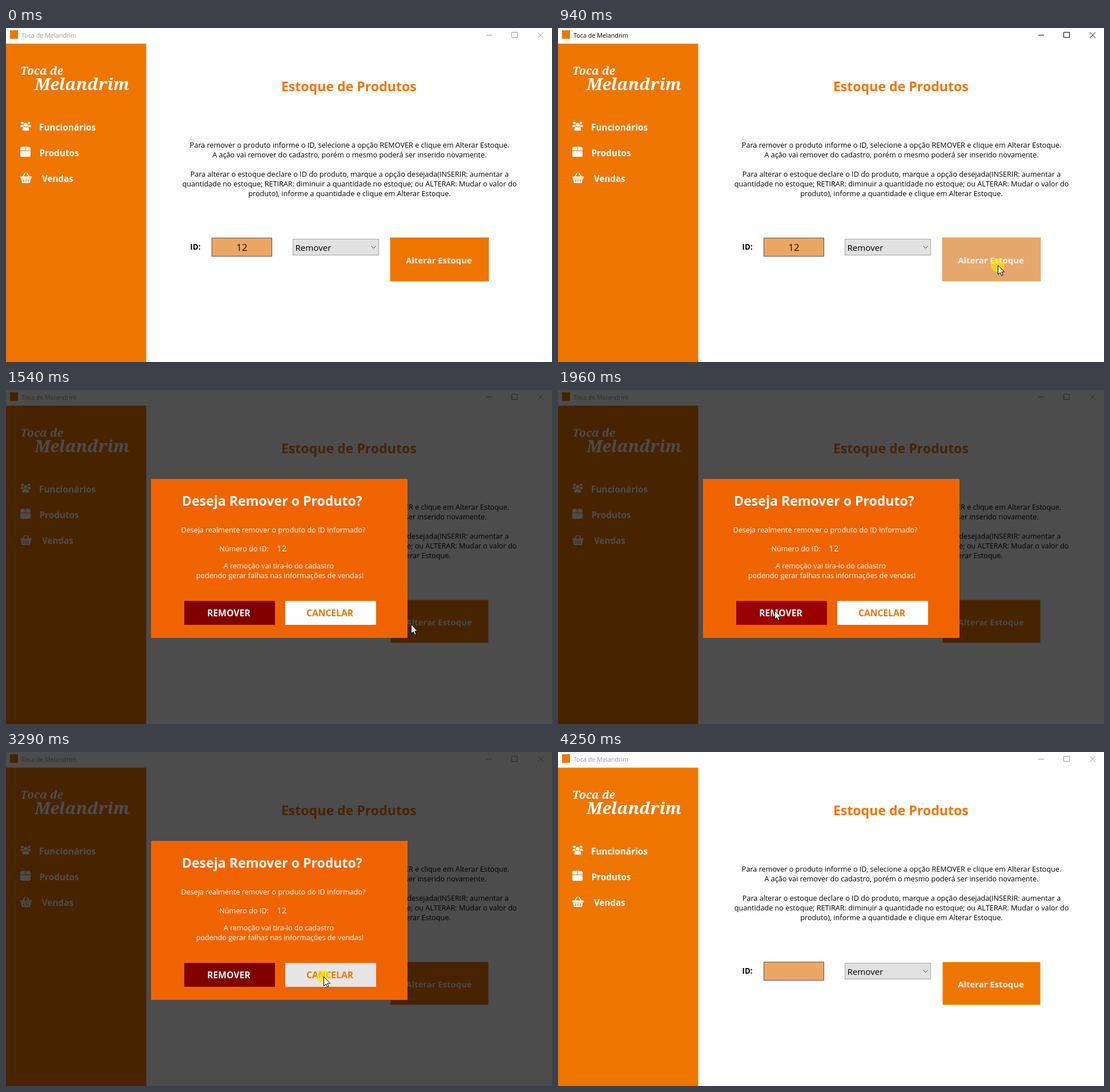
Recreate the animation shown at these times as an HTML page with a canvas. Size 956 px wide and 586 px high, loop 4.39 s.

```html
<!DOCTYPE html>
<html lang="pt">
<head>
<meta charset="utf-8">
<title>Estoque</title>
<style>
html, body { margin: 0; width: 100%; height: 100%; overflow: hidden; background: #fff; }
canvas { display: block; }
</style>
</head>
<body>
<canvas id="stage" width="956" height="586"></canvas>
<script>
const g = document.getElementById('stage').getContext('2d');
const LOOP = 4390, STEP = 69.5;
const ORANGE = '#ee7600', WHITE = '#fff';
const CLICK = 940, OPEN = 1070, READY = 1140, CANCEL = 3290, CLOSE = 3420, LEAVE = 4250;

const smooth = p => p * p * (3 - 2 * p);
const moves = [
  { at: 390, n: 7, from: [923, 566], to: [770, 416], ease: p => 1 - (1 - p) ** 1.5 },
  { at: 1470, n: 8, from: [770, 416], to: [379, 386], ease: smooth },
  { at: 2490, n: 3, from: [379, 386], to: [556, 394], ease: smooth },
  { at: 3490, n: 11, from: [556, 394], to: [900, 575], ease: p => p ** 3, bend: 1.5 }
];

// The pointer is sampled in steps, as in a screen recording.
function pointer(t) {
  if (t < moves[0].at || t >= LEAVE) return null;
  const m = moves.filter(m => t >= m.at).pop();
  const k = Math.min(m.n, Math.floor((t - m.at) / STEP) + 1);
  const p = m.ease(k / m.n), q = p ** (m.bend || 1);
  return [
    Math.round(m.from[0] + (m.to[0] - m.from[0]) * p),
    Math.round(m.from[1] + (m.to[1] - m.from[1]) * q)
  ];
}

function rect(x, y, w, h, color) {
  g.fillStyle = color;
  g.fillRect(x, y, w, h);
}

function frame(x, y, w, h, fill, line) {
  rect(x, y, w, h, line);
  rect(x + 1, y + 1, w - 2, h - 2, fill);
}

function text(s, x, y, size, color, { style = '', align = 'left', family = '"Open Sans", sans-serif' } = {}) {
  g.font = `${style} ${size}px ${family}`;
  g.textAlign = align;
  g.fillStyle = color;
  g.fillText(s, x, y);
}

const bold = { style: 'bold' };
const center = { align: 'center' };
const boldCenter = { style: 'bold', align: 'center' };

function line(color, width, ...points) {
  g.strokeStyle = color;
  g.lineWidth = width;
  g.beginPath();
  points.forEach(([x, y]) => g.lineTo(x, y));
  g.stroke();
}

function shape(color, ...points) {
  g.fillStyle = color;
  g.beginPath();
  points.forEach(([x, y]) => g.lineTo(x, y));
  g.closePath();
  g.fill();
}

function disc(x, y, r, color) {
  g.fillStyle = color;
  g.beginPath();
  g.arc(x, y, r, 0, 7);
  g.fill();
}

function round(x, y, w, h, radii, color) {
  g.fillStyle = color;
  g.beginPath();
  g.roundRect(x, y, w, h, radii);
  g.fill();
}

function inside(p, x, y, w, h) {
  return p && p[0] >= x && p[0] < x + w && p[1] >= y && p[1] < y + h;
}

function titleBar(active) {
  const ink = active ? '#000' : '#999';
  rect(7, 4, 14, 15, ORANGE);
  text('Toca de Melandrim', 27, 17, 10.8, ink);
  rect(841, 12, 10, 1, ink);
  frame(885, 7, 11, 10, WHITE, ink);
  line(ink, 1, [931, 7.5], [941, 17.5]);
  line(ink, 1, [941, 7.5], [931, 17.5]);
}

function icons() {
  for (const x of [28.5, 40.5]) {
    disc(x, 166.5, 2.3, WHITE);
    round(x - 3.3, 170, 6.6, 3.8, [3, 3, 1, 1], WHITE);
  }
  disc(34.5, 170, 4.3, ORANGE);
  disc(34.5, 169.8, 3.3, WHITE);
  round(28.6, 174, 11.8, 6, [4, 4, 1, 1], WHITE);

  round(25, 208.5, 8.5, 6.5, [3, 0, 0, 0], WHITE);
  round(34.5, 208.5, 8.5, 6.5, [0, 3, 0, 0], WHITE);
  round(25, 216, 18, 10, [0, 0, 2, 2], WHITE);

  line(WHITE, 2, [29, 262], [33.5, 254.5]);
  line(WHITE, 2, [41, 262], [36.5, 254.5]);
  round(25, 260.5, 20, 3, 1, WHITE);
  shape(WHITE, [26.5, 264], [43.5, 264], [42, 272], [28, 272]);
  for (const x of [30.5, 34.3, 38.1]) rect(x, 265, 1.4, 5, ORANGE);
}

function sidebar() {
  rect(0, 27.5, 245.5, 559, ORANGE);
  const logo = { style: 'italic 900', family: '"Noto Serif", serif' };
  text('Toca de', 25, 82, 19.3, WHITE, logo);
  text('Melandrim', 50, 109, 29, WHITE, logo);
  icons();
  text('Funcionários', 58, 179.5, 15.4, WHITE, bold);
  text('Produtos', 58.5, 224.5, 15.3, WHITE, bold);
  text('Vendas', 63, 269.5, 15.2, WHITE, bold);
}

function page(t, hover) {
  rect(0, 0, 956, 586, WHITE);
  titleBar((t >= CLICK && t < OPEN) || (t >= CLOSE && t < LEAVE));
  sidebar();
  text('Estoque de Produtos', 600.3, 111, 23.1, ORANGE, boldCenter);
  [
    ['Para remover o produto informe o ID, selecione a opção REMOVER e clique em Alterar Estoque.', 210],
    ['A ação vai remover do cadastro, porém o mesmo poderá ser inserido novamente.', 227],
    ['Para alterar o estoque declare o ID do produto, marque a opção desejada(INSERIR: aumentar a', 261],
    ['quantidade no estoque; RETIRAR: diminuir a quantidade no estoque; ou ALTERAR: Mudar o valor do', 278],
    ['produto), informe a quantidade e clique em Alterar Estoque.', 295]
  ].forEach(([s, y]) => text(s, 601.5, y, 12.65, '#000', center));

  text('ID:', 322.5, 389, 13.3, '#000', bold);
  frame(360, 368, 106, 33, '#eba664', '#555');
  if (t < CLOSE) text('12', 413, 391, 17, '#111', center);
  frame(502, 370, 151, 29, '#e1e1e1', '#a5a5a5');
  text('Remover', 506.5, 391, 15.1, '#000');
  line('#444', 1, [639.5, 382.5], [643.5, 386.5], [647.5, 382.5]);

  // The focused button is one pixel larger on each side.
  const inset = (t >= READY && t < CLOSE) || t >= LEAVE ? 1 : 0;
  rect(672.5 + inset, 367.5 + inset, 173 - 2 * inset, 77 - 2 * inset, hover ? '#e5a76b' : ORANGE);
  text('Alterar Estoque', 758, 413, 14.9, '#f0f0f0', boldCenter);
}

function dialog(t, p) {
  const loading = t < READY;
  rect(0, 0, 956, 586, 'rgba(0,0,0,.7)');
  g.fillStyle = '#f06400';
  g.beginPath();
  g.rect(254, 156, 449, 279);
  if (loading) {
    // Labels that are not painted yet leave gaps.
    g.rect(302, 178, 331, 31);
    g.rect(473, 266, 100, 22);
    g.rect(329, 299, 303, 34);
  }
  g.fill('evenodd');
  if (loading) {
    rect(303, 236, 336, 17, '#000');
    rect(371, 269, 95, 17, '#000');
  } else {
    text('Deseja Remover o Produto?', 466, 203, 23.1, WHITE, boldCenter);
    text('Deseja realmente remover o produto do ID informado?', 468, 250, 12.6, WHITE, center);
    text('Número do ID:', 373.5, 283, 12.6, WHITE);
    text('12', 474, 283, 15.2, WHITE);
    text('A remoção vai tira-lo do cadastro', 477.5, 313, 12.6, WHITE, center);
    text('podendo gerar falhas nas informações de vendas!', 479.5, 330, 12.6, WHITE, center);
  }
  const remove = [312, 370, 159, 42], cancel = [489, 370, 159, 42];
  rect(...remove, inside(p, ...remove) ? '#990000' : '#800000');
  rect(...cancel, inside(p, ...cancel) ? '#e5e5e5' : WHITE);
  text('REMOVER', 390, 397, 15.7, '#f5f5f5', boldCenter);
  text('CANCELAR', 567, 397, 15.6, ORANGE, boldCenter);
}

function arrow([x, y]) {
  g.save();
  g.translate(x + .5, y + .5);
  shape(WHITE, [0, 0], [0, 16], [3.7, 12.5], [6.2, 18], [8.6, 17], [6.2, 11.5], [11, 11.5]);
  g.strokeStyle = '#000';
  g.lineWidth = 1;
  g.stroke();
  g.restore();
}

function draw(t) {
  const p = pointer(t), open = t >= OPEN && t < CLOSE;
  page(t, !open && inside(p, 673, 368, 172, 76));
  if (open) dialog(t, p);
  const pressed = (t >= CLICK && t < OPEN) || (t >= CANCEL && t < CLOSE);
  if (pressed) disc(p[0] - .5, p[1], 12, 'rgba(255,230,0,.6)');
  if (p) arrow(p);
}

const start = performance.now();
function tick() {
  draw((performance.now() - start) % LOOP);
  requestAnimationFrame(tick);
}
tick();
</script>
</body>
</html>
```
